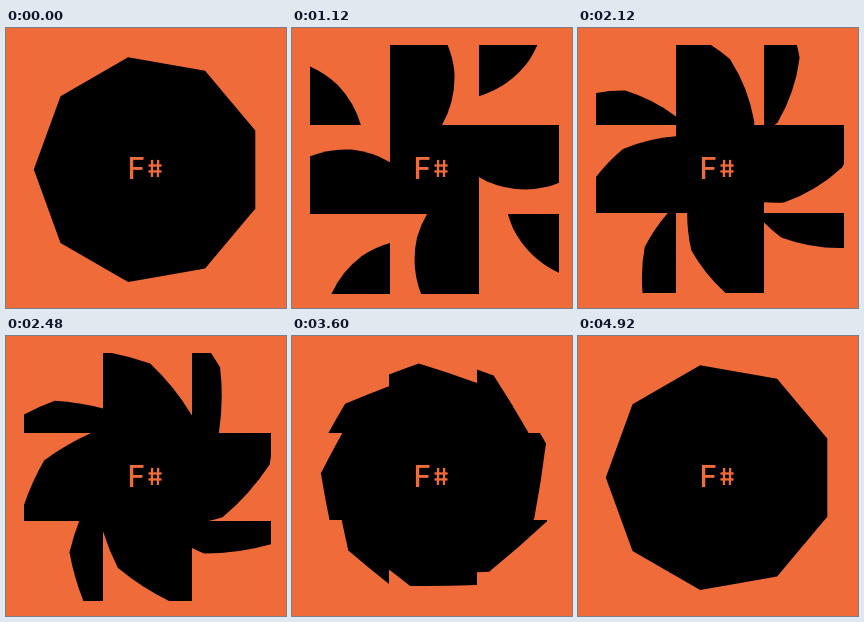
An HTML page with a canvas that plays this animation: 280 px wide and 280 px high, repeating every 5000 ms.

```html
<!DOCTYPE html>
<html lang="en">
<head>
<meta charset="utf-8">
<title>F#</title>
<style>
  html, body { margin: 0; height: 100%; overflow: hidden; background: #ef6c3a; }
  canvas { display: block; }
</style>
</head>
<body>
<canvas id="stage" width="280" height="280"></canvas>
<script>
const ctx = document.getElementById('stage').getContext('2d');
const ORANGE = '#ef6c3a';
const LOOP = 5000, STEP = 40, MOVE = 4880;
const SIDES = 9, SLICE = 2 * Math.PI / SIDES;
const TURN = 104 * Math.PI / 180;
const CENTER = { x: 142, y: 141.6 };
const GRID = [0, 80.5, 169.3, 249.6], GRID_X = 17.6, GRID_Y = 17;

const mix = (a, b, p) => a + (b - a) * p;

// Cubic Bezier easing with control points (.5, 0) and (.38, 1)
function ease(x) {
  let lo = 0, hi = 1;
  for (let i = 0; i < 24; i++) {
    const s = (lo + hi) / 2, r = 1 - s;
    if (3 * r * r * s * .5 + 3 * r * s * s * .38 + s ** 3 < x) lo = s;
    else hi = s;
  }
  return lo * lo * (3 - 2 * lo);
}

const polar = (radius, angle) => [radius * Math.cos(angle), radius * Math.sin(angle)];

// Nonagon around the origin; bow 1 bends its sides into a circle, bow 0 leaves them straight
function nonagon(radius, bow) {
  const half = Math.cos(SLICE / 2);
  const control = radius * mix(half, 1 / half, bow);
  ctx.beginPath();
  ctx.moveTo(-radius, 0);
  for (let i = 0; i < SIDES; i++) {
    const a = Math.PI + i * SLICE;
    ctx.quadraticCurveTo(...polar(control, a + SLICE / 2), ...polar(radius, a + SLICE));
  }
  ctx.fill();
}

// One window of the grid, showing the shape turned about the window's middle
function drawTile(x0, y0, x1, y1, p) {
  const cx = (x0 + x1) / 2, cy = (y0 + y1) / 2;
  const left = Math.round(x0), top = Math.round(y0);
  const spread = mix(.81, 1, p);
  ctx.save();
  ctx.beginPath();
  ctx.rect(left, top, Math.round(x1) - left, Math.round(y1) - top);
  ctx.clip();
  ctx.translate(cx, cy);
  ctx.rotate(TURN * (1 - p));
  ctx.translate((CENTER.x - cx) * spread, (CENTER.y - cy) * spread);
  nonagon(mix(87.5, 114.2, p), 1 - p);
  ctx.restore();
}

function drawLabel() {
  ctx.fillStyle = ORANGE;
  ctx.font = '500 30px Inter, sans-serif';
  ctx.fillText('F', 121.5, 151);
  // The sharp sign stands upright
  ctx.save();
  ctx.transform(1, 0, .15, 1, 142.8, 149.3);
  ctx.font = '600 23.5px Inter, sans-serif';
  ctx.fillText('#', 0, 0);
  ctx.restore();
}

function draw(time) {
  const t = Math.floor(time % LOOP / STEP) * STEP;
  const p = t < STEP ? 1 : ease(Math.min(1, (t - STEP) / MOVE));
  const scale = mix(1, .987, p);
  const xs = GRID.map(v => GRID_X + v * scale);
  const ys = GRID.map(v => GRID_Y + v * scale);

  ctx.fillStyle = ORANGE;
  ctx.fillRect(0, 0, 280, 280);
  ctx.fillStyle = '#000';
  for (let row = 0; row < 3; row++)
    for (let col = 0; col < 3; col++)
      drawTile(xs[col], ys[row], xs[col + 1], ys[row + 1], p);
  drawLabel();
}

function frame() {
  draw(performance.now());
  requestAnimationFrame(frame);
}
frame();
</script>
</body>
</html>
```
